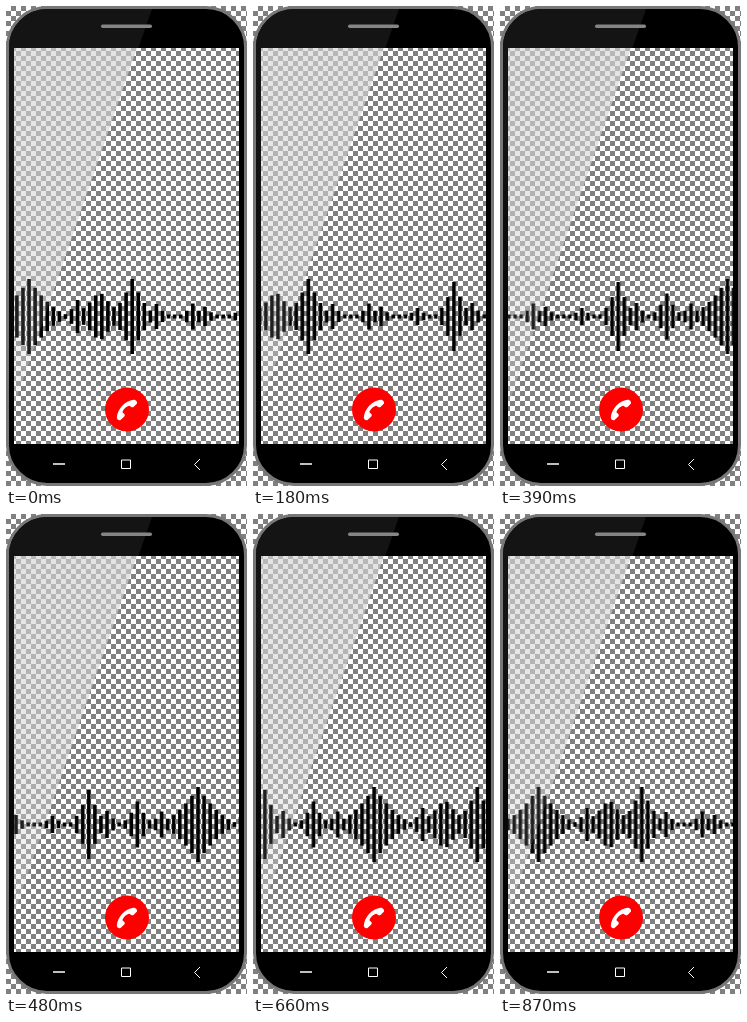
An HTML page that plays this animation: 241x480 px, repeating every 0.9 s.

```html
<!DOCTYPE html>
<html lang="en">
<head>
<meta charset="utf-8">
<title>Voice call</title>
<style>
html, body { margin: 0; height: 100%; overflow: hidden; background: #fff; }
svg { display: block; width: 100vw; height: 100vh; }
#wave { animation: scroll 900ms steps(30) infinite; }
@keyframes scroll { to { transform: translateX(-354.3px); } }
</style>
</head>
<body>
<svg viewBox="0 0 241 480" preserveAspectRatio="none">
  <defs>
    <pattern id="checks" width="10" height="10" patternUnits="userSpaceOnUse">
      <path fill="#fff" d="M0 0h10v10h-10z"/>
      <path fill="#808080" d="M5 0h5v5h-5zM0 5h5v5h-5z"/>
    </pattern>
    <linearGradient id="gloss" gradientUnits="userSpaceOnUse" x1="60" y1="42" x2="20" y2="400">
      <stop offset="0" stop-color="#ccc" stop-opacity=".6"/>
      <stop offset=".55" stop-color="#ccc" stop-opacity=".5"/>
      <stop offset="1" stop-color="#ccc" stop-opacity=".15"/>
    </linearGradient>
    <linearGradient id="sheen" x2="0" y2="1">
      <stop offset=".3" stop-color="#141414"/>
      <stop offset="1" stop-color="#000"/>
    </linearGradient>
    <clipPath id="screen"><path d="M8 42h225v396h-225z"/></clipPath>
    <clipPath id="shell"><rect x="3" y="3" width="235" height="474" rx="38"/></clipPath>
  </defs>
  <path fill="url(#checks)" d="M0 0h241v480h-241z"/>
  <rect x="1.500" y="1.500" width="238" height="477" rx="39.500" stroke="#777" stroke-width="3"/>
  <path clip-path="url(#shell)" fill="url(#sheen)" d="M0 0H147L8 400H0z"/>
  <rect x="95" y="18.500" width="51" height="3.400" rx="1.700" fill="#858585"/>
  <g clip-path="url(#screen)">
    <path fill="url(#checks)" d="M8 42h225v396h-225z"/>
    <path fill="url(#gloss)" d="M8 42H131L8 400z"/>
    <g id="wave" stroke="#000" stroke-width="3.600"></g>
    <path fill="#fff" opacity=".12" d="M8 42H131L8 400z"/>
  </g>
  <circle cx="121" cy="403.500" r="22" fill="#f00"/>
  <path fill="#fff" d="M110.800 411.500C111.500 403 119 394.500 127.500 393.700C130 393.600 131.500 396 131 397.500L127.500 401C126 402 124.500 400.500 123.500 399.700C120 400.400 117 403.300 116.400 406.300C118.500 408 119.500 408.800 118.300 410.500L114.500 414C113 415 110.800 413.500 110.800 411.500Z"/>
  <g fill="none" stroke="#fff">
    <path stroke-width="1.500" d="M47 458h12"/>
    <path d="M115.500 454h9v8.500h-9z"/>
    <path d="M194 453l-5.500 5.500 5.500 5.500"/>
  </g>
</svg>
<script>
// Each burst: centre bar, height, reach in bars.
const bursts = [
  [2, 75, 8], [10, 33, 3], [13.6, 52, 6], [19, 75, 5], [23, 25, 3], [29, 26, 3],
  [31, 19, 3], [37, 17, 3], [43, 69, 4], [46, 27, 3], [51, 46, 3.5], [55, 26, 3]
];
const cycle = 59, pitch = 6.067, bars = 98;

function loudness(i) {
  const levels = bursts.map(([centre, height, reach]) => {
    const gap = Math.abs(i - centre) % cycle;
    const near = Math.min(gap, cycle - gap);
    return height * Math.max(0, 1 - near / reach) ** 2;
  });
  return Math.max(4, ...levels);
}

const wave = document.getElementById('wave');
for (let i = -1; i < bars; i++) {
  const h = loudness(i);
  const bar = document.createElementNS('http://www.w3.org/2000/svg', 'path');
  bar.setAttribute('d', `M${10.9 + i * pitch} ${310.5 - h / 2}v${h}`);
  wave.append(bar);
}
</script>
</body>
</html>
```
